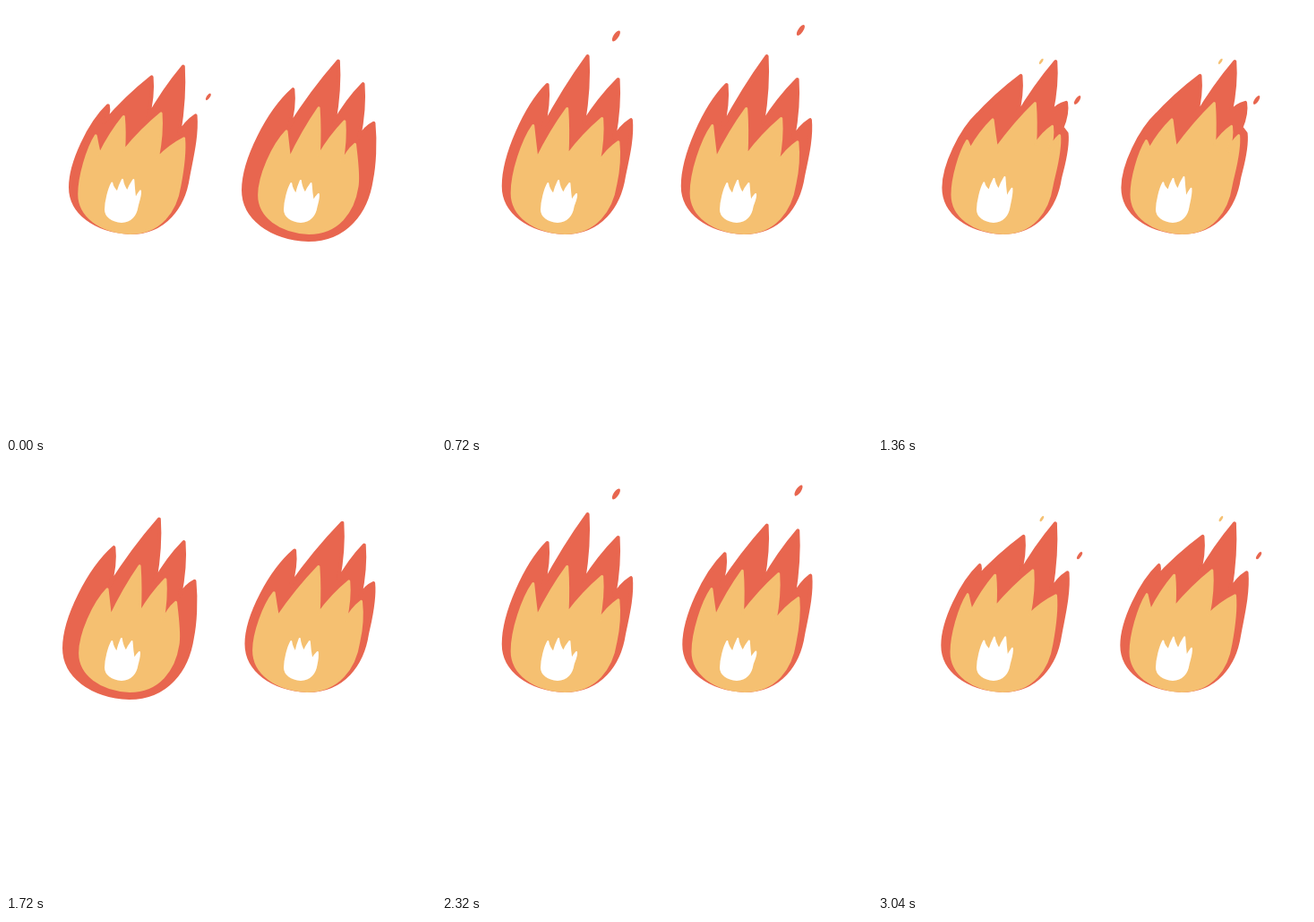
Animation, 480 px wide and 480 px high, one loop 3080 ms. Source, as an HTML page:

```html
<!DOCTYPE html>
<html lang="en">
<head>
<meta charset="utf-8">
<title>Flames</title>
<style>
html, body { margin: 0; width: 100%; height: 100%; overflow: hidden; background: #fff; }
svg { display: block; width: 100vw; height: 100vh; }
path { stroke-linejoin: round; }
</style>
</head>
<body>
<svg id="stage" viewBox="0 0 480 480"></svg>
<script>
const RED = '#e8664f', GOLD = '#f5c071', WHITE = '#fff';
const STEP = 40, COUNT = 77, HOLDS = [19, 50, 54];

// Tongues ride a rail from left to right, one place per cycle: [place, x, y].
const RED_RAIL = [
  [0, 113, 117], [.2, 118, 86], [.6, 128, 105], [.95, 157, 73], [1.04, 163, 79],
  [1.2, 163, 54], [1.36, 175, 62], [1.6, 184, 83], [1.95, 199, 56], [2.2, 197, 80],
  [2.6, 204, 99], [2.95, 209, 93], [3.04, 212, 120], [3.5, 210, 135], [3.95, 211, 130], [4, 211, 142]
];
const GOLD_RAIL = [
  [0, 100, 147], [.2, 102, 132], [.55, 97, 152], [.95, 126, 128], [1.2, 140, 113],
  [1.36, 148, 112], [1.6, 162, 125], [1.95, 178, 97], [2.04, 173, 118], [2.2, 179, 124],
  [2.6, 188, 136], [2.95, 191, 121], [3.04, 199, 146], [3.3, 196, 153], [4, 203, 143]
];

// Cycles completed at each step.
const FLAMES = [
  { dx: 0, clock: [[0, .05], [18, 1.2], [26, 1.55], [31, 1.95], [38, 2.05],
    [43, 2.31], [58, 3.2], [65, 3.55], [69, 3.95], [77, 4.05]] },
  { dx: 200, clock: [[0, .31], [4, .38], [18, 1.2], [26, 1.7], [31, 1.95], [38, 2.05],
    [43, 2.38], [58, 3.12], [69, 3.95], [77, 4.05]] }
];

// Sparks fly off in every second cycle.
const SPARKS = [
  { fill: RED, span: [1.12, 1.62], from: [192, 36, 7], to: [207, 20, 7], ease: 1, lead: .2 },
  { fill: RED, span: [1.65, 2.08], from: [217, 111, 8], to: [228, 99, 3.5], ease: 3, lead: 0 },
  { fill: GOLD, span: [1.5, 2.045], from: [175, 69, 4], to: [183, 61, 3.5], ease: 1, lead: 0 }
];

const mix = (a, b, u) => a + (b - a) * u;
const mixAll = (a, b, u) => a.map((v, i) => mix(v, b[i], u));
const clamp = v => Math.max(0, Math.min(1, v));
const wave = (p, peak) => Math.cos(2 * Math.PI * (p - peak));
const bump = (p, at, width) => {
  const d = Math.abs(p - at);
  return clamp(1 - Math.min(d, 1 - d) / width);
};

// Values at u along a list of [u, ...values].
function along(list, u) {
  let i = 0;
  while (i < list.length - 2 && list[i + 1][0] <= u) i++;
  const a = list[i], b = list[i + 1];
  return mixAll(a, b, clamp((u - a[0]) / (b[0] - a[0]))).slice(1);
}

// Tips and valleys riding the rail, with a bud growing at the left late in the cycle.
function ride(rail, floors, lean, p, box) {
  const dip = 15 * bump(p, .97, .12);
  const valley = (t, i) => [t[0] + lean - 4 * i * (lean > 0), floors[i] - dip];
  const tips = [0, 1, 2, 3].map(i => along(rail, i + p));
  const valleys = floors.map((y, i) => valley(tips[i], i));
  const grow = clamp((p - .95) / .05);
  if (grow > 0) {
    const side = box.base - 52 * (box.right - box.left) / 136;
    const seed = [mix(box.left, tips[0][0], .37), mix(side, tips[0][1], .57)];
    const bud = along(rail, 0);
    tips.unshift(mixAll(seed, bud, grow));
    valleys.unshift(mixAll(seed, valley(bud, 0), grow));
  }
  return { ...box, tips, valleys };
}

function redShape(p, fat) {
  const box = { left: 70 + 4 * wave(p, .8) - 3 * fat, right: 207 + 5 * fat, base: 255 + 8 * fat };
  return ride(RED_RAIL, [131, 126, 143], -5, p, box);
}

function goldShape(p, fat) {
  const box = { left: 79 + 4 * wave(p, .85) + 6 * fat, right: 197 - 2 * fat, base: 255 };
  const shape = ride(GOLD_RAIL, [167, 163, 171], 4, p, box);
  for (const t of [...shape.tips, ...shape.valleys]) t[0] = mix(t[0], 165, .2 * fat);
  return shape;
}

function whiteShape(p) {
  const sway = wave(p, .13), rise = bump(p, .93, .2);
  const tips = [
    [118.5, 197 - rise], [128 + 2.5 * sway, 194 - 3 * rise],
    [139 + 4 * sway, 197 - 10 * rise], [148 + 2.5 * sway, 209 - 9 * rise]
  ];
  const valleys = [208, 207, 216].map((y, i) =>
    [(tips[i][0] + tips[i + 1][0]) / 2 - i, y - 6 * rise]);
  return { left: 110, right: 148, base: 242, tips, valleys };
}

const LAYERS = [
  { color: RED, w: 4, shape: redShape },
  { color: GOLD, w: 3, shape: goldShape },
  { color: WHITE, w: 2, shape: whiteShape }
];

// The stroke rounds the tips, so the path is inset by half its width.
function outline({ left, right, base, tips, valleys }, w) {
  const h = w / 2, L = left + h, R = right - h, B = base - h;
  const k = (R - L) / 136, side = B - 52 * k, turn = B - 63 * k;
  const inset = t => [t[0] - .1 * w, t[1] + h];
  let [x, y] = inset(tips[0]);
  let d = `M${L} ${side}C${L} ${mix(side, y, .3)} ${mix(L, x, .5)} ${mix(side, y, .78)} ${x} ${y}`;
  valleys.forEach(([vx, floor], i) => {
    const vy = floor + w * 1.2;
    const [tx, ty] = inset(tips[i + 1]);
    d += `Q${x + 2 * k} ${mix(y, vy, .45)} ${vx} ${vy}`;
    d += `Q${mix(vx, tx, .5) - 2 * k} ${mix(vy, ty, .5) - 3 * k} ${tx} ${ty}`;
    x = tx; y = ty;
  });
  d += `C${x + 2 * k} ${mix(y, turn, .35)} ${R + k} ${mix(y, turn, .75)} ${R - 2 * k} ${turn}`;
  d += `C${R - 7 * k} ${B - 30 * k} ${R - 28 * k} ${B} ${mix(L, R, .5)} ${B}`;
  return d + `C${L + 28 * k} ${B - 2 * k} ${L} ${B - 23 * k} ${L} ${side}Z`;
}

function add(tag, attrs, parent) {
  const el = document.createElementNS('http://www.w3.org/2000/svg', tag);
  for (const k in attrs) el.setAttribute(k, attrs[k]);
  return parent.appendChild(el);
}

const stage = document.getElementById('stage');
for (const flame of FLAMES) {
  const g = add('g', { transform: `translate(${flame.dx})` }, stage);
  flame.paths = LAYERS.map(({ color, w }) =>
    add('path', { fill: color, stroke: color, 'stroke-width': w }, g));
  flame.sparks = SPARKS.map(({ fill }) => add('ellipse', { fill }, g));
}

function drawSpark(el, spark, cycles, lead) {
  const q = (cycles + 1.9) % 2 + .1 + lead;
  const [start, end] = spark.span;
  const on = q >= start && q <= end;
  el.style.display = on ? '' : 'none';
  if (!on) return;
  const u = ((q - start) / (end - start)) ** spark.ease;
  const [x, y, r] = mixAll(spark.from, spark.to, u);
  el.setAttribute('rx', r);
  el.setAttribute('ry', r * .4);
  el.setAttribute('transform', `translate(${x} ${y}) rotate(-56)`);
}

function draw(step) {
  for (const { dx, clock, paths, sparks } of FLAMES) {
    const [cycles] = along(clock, step);
    const p = cycles % 1, fat = bump(p, .31, .06);
    LAYERS.forEach(({ shape, w }, i) => paths[i].setAttribute('d', outline(shape(p, fat), w)));
    SPARKS.forEach((s, i) => drawSpark(sparks[i], s, cycles, dx ? s.lead : 0));
  }
}

const began = performance.now();
let shown = -1;
function tick() {
  let step = Math.floor(Math.max(0, performance.now() - began) / STEP) % COUNT;
  if (HOLDS.includes(step)) step--;
  if (step !== shown) draw(shown = step);
  requestAnimationFrame(tick);
}
tick();
</script>
</body>
</html>
```
